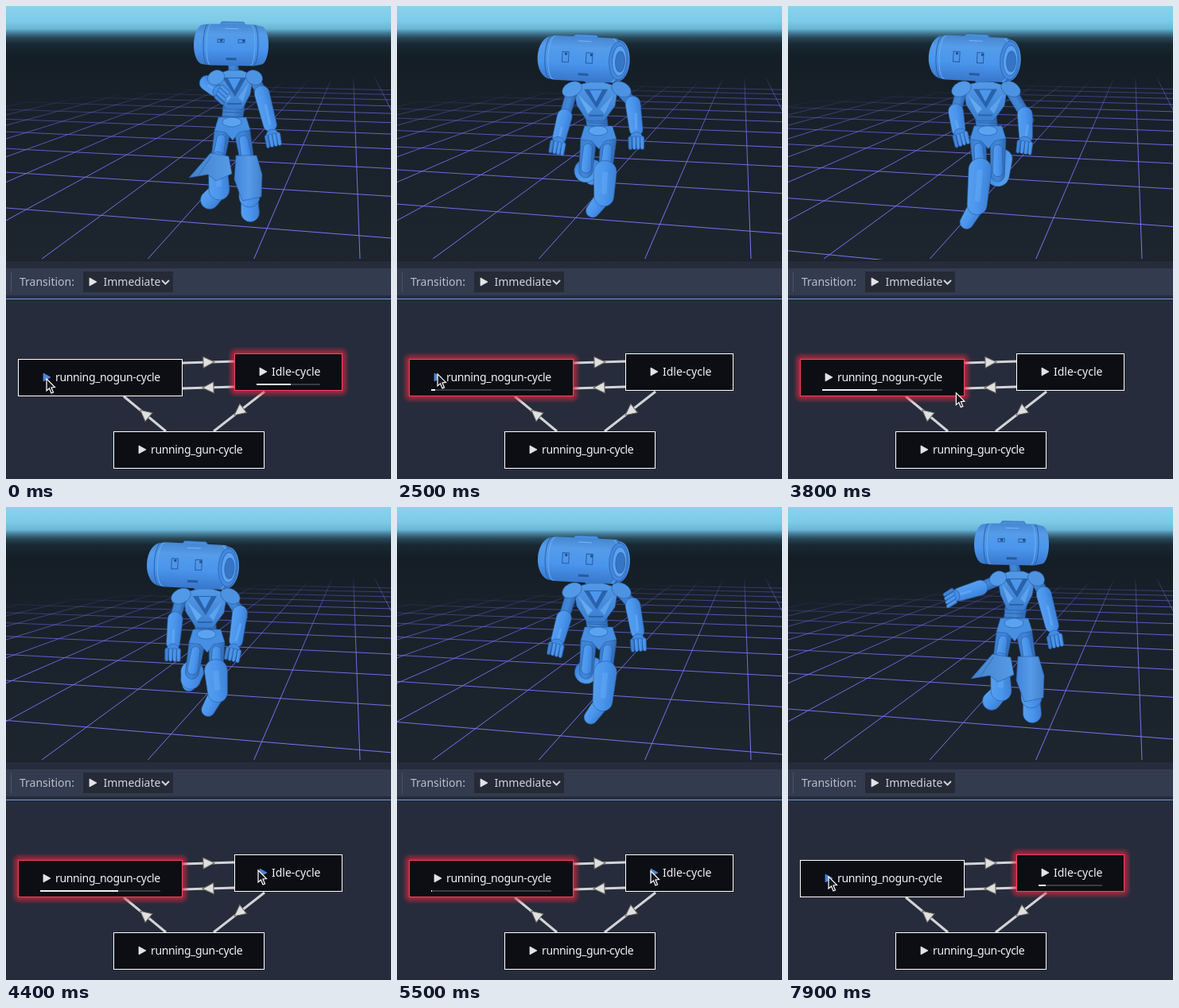
Recreate the animation shown at these times as an HTML page with a canvas. Size 484 px wide and 595 px high, loop 8 s.

```html
<!DOCTYPE html>
<html lang="en">
<head>
<meta charset="utf-8">
<title>State machine preview</title>
<style>
html, body { margin: 0; width: 484px; height: 595px; overflow: hidden; background: #262c3b; }
canvas { display: block; }
</style>
</head>
<body>
<canvas id="stage" width="484" height="595"></canvas>
<script>
const ctx = document.getElementById('stage').getContext('2d');
const LOOP = 8000, STEP = 100;
const RUN_START = 2400, RUN_END = 6150, RUN_LEN = 3070, IDLE_LEN = 16000;
const FONT = '14px "Noto Sans", "Open Sans", sans-serif';
const lerp = (a, b, u) => a + (b - a) * u;
const clamp = u => Math.max(0, Math.min(1, u));
const mix = (a, b, u) => a.map((v, i) => lerp(v, b[i], u));

function ramp(x0, y0, x1, y1, stops) {
  const g = ctx.createLinearGradient(x0, y0, x1, y1);
  for (const [at, color] of stops) g.addColorStop(at, color);
  return g;
}

function poly(pts, fill, edge, width = 1) {
  ctx.beginPath();
  pts.forEach(([x, y]) => ctx.lineTo(x, y));
  ctx.closePath();
  ctx.fillStyle = fill;
  ctx.fill();
  if (edge) { ctx.strokeStyle = edge; ctx.lineWidth = width; ctx.stroke(); }
}

function line(x0, y0, x1, y1, color, width = 1) {
  ctx.beginPath();
  ctx.moveTo(x0, y0);
  ctx.lineTo(x1, y1);
  ctx.strokeStyle = color;
  ctx.lineWidth = width;
  ctx.stroke();
}

function box(x, y, w, h, color) {
  ctx.fillStyle = color;
  ctx.fillRect(x, y, w, h);
}

function text(str, x, y, color, spacing = 0) {
  ctx.font = FONT;
  ctx.letterSpacing = spacing + 'px';
  ctx.fillStyle = color;
  ctx.fillText(str, x, y);
}

// ---------- 3D view ----------
const HORIZON = 32.6;

function drawGround(scroll) {
  box(0, 0, 484, 320, ramp(0, 0, 0, 320, [
    [0, '#8ad3ee'], [.06, '#7ccae8'], [.09, '#6ab5d4'], [.105, '#467f9b'],
    [.125, '#274656'], [.15, '#182833'], [.2, '#141e26'], [.4, '#18212a'], [1, '#1d262e']]));
  ctx.save();
  ctx.beginPath();
  ctx.rect(0, 90, 484, 229);
  ctx.clip();
  const ink = ramp(200, 106, 215, 306, [
    [0, 'rgba(112,108,240,0)'], [.06, 'rgba(112,108,240,.3)'], [.2, 'rgba(112,108,240,.65)'],
    [.45, 'rgba(116,112,242,.9)'], [1, 'rgba(120,116,245,1)']]);
  for (let i = -22; i < 9; i++) {
    const x = 445 + 133.3 * i;
    line(lerp(434.7, x, .2), HORIZON + .2 * 285.4, x, 318, ink);
  }
  for (let k = -2; k < 11; k++) {
    const w = .004517 + .00115 * (k + scroll % 1);
    const d = 1 / w;
    line(0, HORIZON + d, 484, HORIZON + d * (1 + 484 / 2820), ink);
  }
  ctx.restore();
}

// ---------- robot ----------
const EDGE = 'rgba(38,88,156,.6)', DEEP = '#2a62aa';

function limb([x0, y0], [x1, y1], w0, w1, dark = 0) {
  const a = Math.atan2(y1 - y0, x1 - x0), r0 = w0 / 2, r1 = w1 / 2;
  const nx = Math.sin(a), ny = -Math.cos(a), r = Math.max(r0, r1);
  const mx = (x0 + x1) / 2, my = (y0 + y1) / 2;
  ctx.beginPath();
  ctx.arc(x0, y0, r0, a + Math.PI / 2, a - Math.PI / 2);
  ctx.arc(x1, y1, r1, a - Math.PI / 2, a + Math.PI / 2);
  ctx.closePath();
  ctx.fillStyle = ramp(mx - nx * r, my - ny * r, mx + nx * r, my + ny * r, dark
    ? [[0, '#3c7fd0'], [.5, '#4187d8'], [1, '#3068b4']]
    : [[0, '#579fec'], [.5, '#4a95ee'], [1, '#3c80d4']]);
  ctx.fill();
  ctx.strokeStyle = EDGE;
  ctx.lineWidth = 1;
  ctx.stroke();
}

function oval(x, y, rx, ry, turn, fill) {
  ctx.beginPath();
  ctx.ellipse(x, y, rx, ry, turn, 0, 7);
  ctx.fillStyle = fill;
  ctx.fill();
  ctx.strokeStyle = EDGE;
  ctx.lineWidth = 1;
  ctx.stroke();
}

function drawArm(s, e, h) {
  limb(s, e, 14, 13, 1);
  const wrist = mix(e, h, .72);
  limb(mix(s, e, .8), wrist, 19, 17);
  line(...mix(e, h, .2), ...wrist, 'rgba(110,180,250,.5)', 3);
  const a = Math.atan2(h[1] - e[1], h[0] - e[0]);
  const c = Math.cos(a), n = Math.sin(a);
  oval(h[0], h[1], 8, 8, a, '#438ce4');
  for (let i = -1.5; i < 2; i++) {
    const x = h[0] - n * i * 5, y = h[1] + c * i * 5;
    limb([x, y], [x + c * 9, y + n * 9 + 3], 5, 4.5, i > 1);
  }
}

function drawLeg(hip, knee, ankle, toe, run, fin) {
  const shin = () => {
    const w = run ? 29 : 23;
    limb(ankle, toe, run ? 20 : 21, run ? 17 : 23);
    limb(knee, ankle, w, run ? w - 4 : w + 3);
    line(...knee, ...mix(knee, ankle, .9), 'rgba(120,185,250,.3)', 7);
  };
  const thigh = () => {
    limb(hip, knee, 20, 17, 1);
    limb(mix(hip, knee, .25), mix(hip, knee, .9), 11, 13);
  };
  if (ankle[1] < knee[1] + 12) { shin(); thigh(); } else { thigh(); shin(); }
  if (run) return;
  const [x, y] = knee;
  if (fin) {
    poly([[x - 36, y + 21], [x - 9, y - 10], [x + 14, y - 6], [x + 18, y + 16], [x - 2, y + 25], [x - 12, y + 17]],
      ramp(x - 34, y, x + 16, y, [[0, '#4482cc'], [1, '#559ae6']]), EDGE);
    line(x - 8, y - 6, x - 24, y + 18, '#326fb9');
  } else {
    poly([[x - 15, y - 12], [x + 11, y - 12], [x + 18, y + 12], [x + 17, y + 40], [x - 7, y + 45], [x - 17, y + 18]],
      ramp(x - 16, y, x + 18, y, [[0, '#4385d8'], [.5, '#559be9'], [1, '#4380ca']]), EDGE);
  }
}

function drawTorso(cx, cy, px, py, half) {
  limb([cx, cy + 18], [px, py - 6], 27, 26, 1);
  for (let i = 0; i < 4; i++) {
    const y = lerp(cy + 25, py - 8, i / 3);
    line(px - 12, y, px + 12, y + 1, DEEP);
  }
  poly([[px - 17, py - 12], [px + 18, py - 12], [px + 23, py + 4], [px + 9, py + 7],
    [px + 1, py + 17], [px - 8, py + 7], [px - 22, py + 5]], '#468fe2', EDGE);
  oval(px, py - 6, 12, 6, 0, '#5aa3f0');
  poly([[cx - half, cy - 17], [cx - 8, cy - 22], [cx + 9, cy - 22], [cx + half, cy - 16],
    [cx + half - 4, cy + 8], [cx + 10, cy + 27], [cx - 11, cy + 27], [cx - half + 4, cy + 7]],
    ramp(cx, cy - 20, cx, cy + 27, [[0, '#5299e7'], [1, '#3b7ed0']]), EDGE);
  poly([[cx - 15, cy - 13], [cx + 15, cy - 13], [cx + 1, cy + 11]], DEEP);
  poly([[cx - 8, cy - 12], [cx + 8, cy - 12], [cx, cy + 3]], '#4c97ed');
  poly([[cx - half + 6, cy - 6], [cx - 4, cy + 12], [cx - 10, cy + 18]], '#64a9ef');
  poly([[cx + half - 6, cy - 6], [cx + 5, cy + 12], [cx + 11, cy + 18]], '#5ba2ec');
  line(cx - 9, cy + 20, cx + 9, cy + 20, DEEP, 2);
}

function drawHead(x, y, run) {
  const w = run ? 58 : 47, h = run ? 28 : 26, cap = run ? 14 : 9;
  ctx.save();
  ctx.translate(x, y);
  ctx.rotate(run ? .05 : .02);
  poly([[-17, -h + 4], [-12, -h - 3], [15, -h - 3], [20, -h + 4]], '#4a90de', EDGE);
  ctx.beginPath();
  ctx.ellipse(-w + cap + 3, 0, cap + 3, h - 1, 0, Math.PI / 2, -Math.PI / 2);
  ctx.lineTo(-w + 22, -h);
  ctx.lineTo(w - 18, -h);
  ctx.ellipse(w - cap, 0, cap, h - 2, 0, -Math.PI / 2, Math.PI / 2);
  ctx.lineTo(w - 18, h);
  ctx.lineTo(-w + 22, h);
  ctx.closePath();
  ctx.fillStyle = ramp(0, -h, 0, h, [[0, '#4787d1'], [.25, '#559ce9'], [.6, '#4a95ed'], [1, '#3877cb']]);
  ctx.fill();
  for (const [at, color] of [[-w + 17, DEEP], [-w + 21, '#68afef'], [w - 22, '#68afef'], [w - 18, DEEP]]) {
    ctx.beginPath();
    ctx.ellipse(at, 0, cap * .55, h - 1, 0, -Math.PI / 2, Math.PI / 2, at < 0);
    ctx.strokeStyle = color;
    ctx.lineWidth = 1;
    ctx.stroke();
  }
  if (run) {
    oval(w - cap, 0, cap - 2, h - 4, 0, '#4288e2');
    oval(w - cap + 1, 0, cap - 5, h - 9, 0, '#5aa3ef');
    oval(w - cap + 2, 1, cap - 8, h - 15, 0, '#3675c6');
  }
  ctx.strokeStyle = '#285b9e';
  for (const side of [-1, 1]) {
    const mx = run ? side * 15 - 8 : side * 13;
    ctx.strokeRect(mx - 4, run ? -8 : -7, 8, run ? 13 : 4);
    box(mx + side, -7, 3, 3, '#224f8d');
  }
  box(-6, h - 10, 13, 3, '#285b9e');
  box(-8, -h + 5, 17, 1, '#75b7f3');
  ctx.restore();
}

function drawRobot(p, run) {
  const at = i => [p[i], p[i + 1]];
  const [hx, hy, cx, cy, px, py] = p;
  const spread = run ? 30 : 23;
  const legs = [
    { hip: [px - 12, py + 6], i: 14, fin: true },
    { hip: [px + 13, py + 6], i: 20, fin: false }
  ].sort((a, b) => p[a.i + 3] - p[b.i + 3]);
  for (const l of legs) drawLeg(l.hip, at(l.i), at(l.i + 2), at(l.i + 4), run, l.fin);
  limb([hx + 2, hy + 20], [cx, cy - 16], 11, 14, 1);
  drawTorso(cx, cy, px, py, run ? 28 : 24);
  const left = [cx - spread, cy - 11], right = [cx + spread + 2, cy - 11];
  drawArm(right, at(10), at(12));
  drawArm(left, at(6), at(8));
  oval(left[0], left[1] - 2, run ? 13 : 11, 9, -.45, '#529ae8');
  oval(right[0], right[1] - 2, run ? 13 : 11, 9, .5, '#4d93e2');
  drawHead(hx, hy, run);
}

// Pose: head, chest, pelvis, two arms (elbow, hand), two legs (knee, ankle, toe)
const PHASES = [0, .26, .48, .656, .8];
const STRIDE = [
  [235, 67, 250, 118, 253, 163, 207, 148, 200, 174, 300, 128, 304, 168, 238, 208, 246, 200, 247, 208, 262, 208, 258, 246, 243, 267],
  [231, 62, 250, 114, 250, 162, 226, 132, 244, 148, 302, 122, 264, 152, 231, 205, 231, 256, 211, 291, 261, 216, 287, 175, 286, 167],
  [235, 67, 248, 118, 251, 163, 208, 140, 214, 164, 302, 145, 300, 174, 242, 206, 238, 248, 226, 268, 264, 212, 268, 196, 270, 205],
  [235, 74, 250, 125, 252, 166, 211, 148, 210, 180, 297, 138, 286, 180, 234, 208, 232, 216, 230, 222, 264, 206, 266, 234, 254, 256],
  [236, 64, 250, 116, 253, 163, 214, 138, 232, 156, 300, 140, 296, 172, 238, 214, 222, 186, 220, 178, 268, 206, 266, 254, 258, 282]
];
const STAND = [287, 103, 284, 152];
const STAND_REST = [324, 114, 335, 163, 266, 195, 268, 231, 256, 244, 304, 200, 306, 240, 307, 260];
// Head, left elbow, left hand
const FIST = [283, 49, 250, 98, 268, 108], LOWERED = [281, 48, 255, 104, 247, 124];
const REACH = [283, 48, 238, 106, 208, 116], REACH_HIGH = [281, 47, 236, 104, 208, 112];

function runPose(phase) {
  const n = PHASES.length;
  let i = n - 1;
  while (PHASES[i] > phase) i--;
  const end = i + 1 < n ? PHASES[i + 1] : 1;
  const u = (phase - PHASES[i]) / (end - PHASES[i]);
  const k = d => STRIDE[(i + d + n) % n];
  return k(0).map((b, j) => {
    const a = k(-1)[j], c = k(1)[j], d = k(2)[j];
    return b + .5 * u * (c - a + u * (2 * a - 5 * b + 4 * c - d + u * (3 * (b - c) + d - a)));
  });
}

function idlePose(t) {
  const v = t < RUN_START
    ? mix(FIST, LOWERED, clamp(t / 1400))
    : mix(REACH, REACH_HIGH, clamp((t - 6800) / 1100));
  return [v[0], v[1], ...STAND, ...v.slice(2), ...STAND_REST];
}

// ---------- editor panel ----------
function playIcon(x, y, color) {
  poly([[x, y - 5], [x + 9, y], [x, y + 5]], color, color, .8);
}

function drawToolbar() {
  box(0, 319, 484, 276, '#262c3b');
  box(0, 319, 484, 2, '#1d222c');
  box(0, 330, 484, 34, '#333b4f');
  box(0, 368, 484, 1, '#699ce8');
  box(6, 334, 1, 26, '#4d5468');
  text('Transition:', 17, 352, '#b9bfcb');
  box(97, 334, 113, 26, '#252a36');
  playIcon(105, 347, '#e4e5e8');
  text('Immediate', 122.5, 352, '#cfd3dc');
  ctx.beginPath();
  ctx.moveTo(196, 345);
  ctx.lineTo(200.5, 349.5);
  ctx.lineTo(205, 345);
  ctx.strokeStyle = '#cfd3dc';
  ctx.lineWidth = 2;
  ctx.stroke();
}

function drawLink(x0, y0, x1, y1) {
  line(x0, y0, x1, y1, '#d2d3d6', 3);
  ctx.save();
  ctx.translate((x0 + x1) / 2, (y0 + y1) / 2);
  ctx.rotate(Math.atan2(y1 - y0, x1 - x0));
  poly([[-6.5, -7], [7.5, 0], [-6.5, 7]], '#e0e0e0', '#6b6760', 1);
  ctx.restore();
}

function drawNode(n, progress, hover) {
  const active = progress !== null;
  if (active) {
    ctx.lineWidth = 1;
    for (let i = 1; i <= 8; i++) {
      ctx.strokeStyle = `rgba(226,42,66,${.72 * (1 - i / 9)})`;
      ctx.beginPath();
      ctx.roundRect(n.x + .5 - i, n.y + .5 - i, n.w - 1 + 2 * i, n.h - 1 + 2 * i, i);
      ctx.stroke();
    }
  }
  box(n.x, n.y, n.w, n.h, '#0c0e13');
  ctx.strokeStyle = active ? '#f8405a' : '#ffffff';
  ctx.lineWidth = 1;
  ctx.strokeRect(n.x + .5, n.y + .5, n.w - 1, n.h - 1);
  const mid = n.y + 23;
  playIcon(n.tx - 15, mid, hover ? '#4d84d4' : '#e3e4e6');
  text(n.name, n.tx, mid + 5, '#f1f2f4', n.gap);
  if (active) {
    const x = n.tx - 19, w = n.x + n.w - 28 - x;
    box(x, n.y + 38, w, 2, '#3a3c42');
    box(x, n.y + 38, Math.max(1, Math.round(w * progress)), 2, '#f2f2f2');
  }
}

const IDLE = { name: 'Idle-cycle', x: 287, y: 437, w: 136, h: 47, tx: 334, gap: 0 };
const NOGUN = { name: 'running_nogun-cycle', x: 15, y: 444, w: 207, h: 47, tx: 62, gap: -.35 };
const GUN = { name: 'running_gun-cycle', x: 135, y: 535, w: 190, h: 47, tx: 182, gap: -.35 };

// ---------- pointer ----------
const PATH = [
  [0, 51, 469], [1000, 51, 467], [1400, 51, 462], [2600, 51, 463], [3000, 112, 471], [3200, 118, 472],
  [3500, 136, 477], [3700, 186, 490], [4000, 262, 480], [4300, 317, 457], [4400, 317, 457], [5500, 319, 458],
  [6200, 318, 459], [6800, 317, 460], [7000, 284, 461], [7200, 124, 463], [7500, 51, 465], [8000, 51, 465]];

function pointerAt(t) {
  const i = PATH.findIndex(k => k[0] > t);
  const a = PATH[i - 1], b = PATH[i];
  return mix(a, b, (t - a[0]) / (b[0] - a[0])).slice(1);
}

function drawPointer(x, y) {
  if (x > 62 && x < 194 && y > 457 && y < 478) {
    for (const [color, w] of [['#ffffff', 3], ['#0c0c0c', 1]]) {
      line(x, y - 8, x, y + 8, color, w);
      line(x - 4, y - 8, x + 4, y - 8, color, w);
      line(x - 4, y + 8, x + 4, y + 8, color, w);
    }
    return;
  }
  const arrow = [[0, 0], [0, 15], [3.5, 12], [6, 18], [8.5, 17], [6, 11], [10.5, 10.5]];
  poly(arrow.map(([a, b]) => [x + a, y + b]), '#15171c', '#ffffff', 1.2);
}

function render(t) {
  const run = t >= RUN_START && t < RUN_END;
  const since = t - RUN_START;
  drawGround(run ? since * .00088 : 0);
  const phase = since / RUN_LEN % 1;
  drawRobot(run ? runPose(phase) : idlePose(t), run);
  drawToolbar();

  drawLink(222, 449, 287, 447);
  drawLink(287, 479, 222, 481);
  drawLink(325, 485, 261, 535);
  drawLink(201, 535, 148, 491);

  const [x, y] = pointerAt(t);
  const over = (n, d) => Math.abs(x - n.tx + 11) < 8 && Math.abs(y - n.y - 23) < d;
  const idle = t < RUN_START ? .54 + t / IDLE_LEN : (t - RUN_END) / IDLE_LEN;
  drawNode(NOGUN, run ? phase : null, over(NOGUN, 8));
  drawNode(IDLE, run ? null : idle, over(IDLE, 7));
  drawNode(GUN, null, false);
  drawPointer(x, y);
}

const start = performance.now();
function tick(now) {
  const t = Math.max(0, now - start) % LOOP;
  render(Math.floor(t / STEP) * STEP);
  requestAnimationFrame(tick);
}
render(0);
requestAnimationFrame(tick);
</script>
</body>
</html>
```
